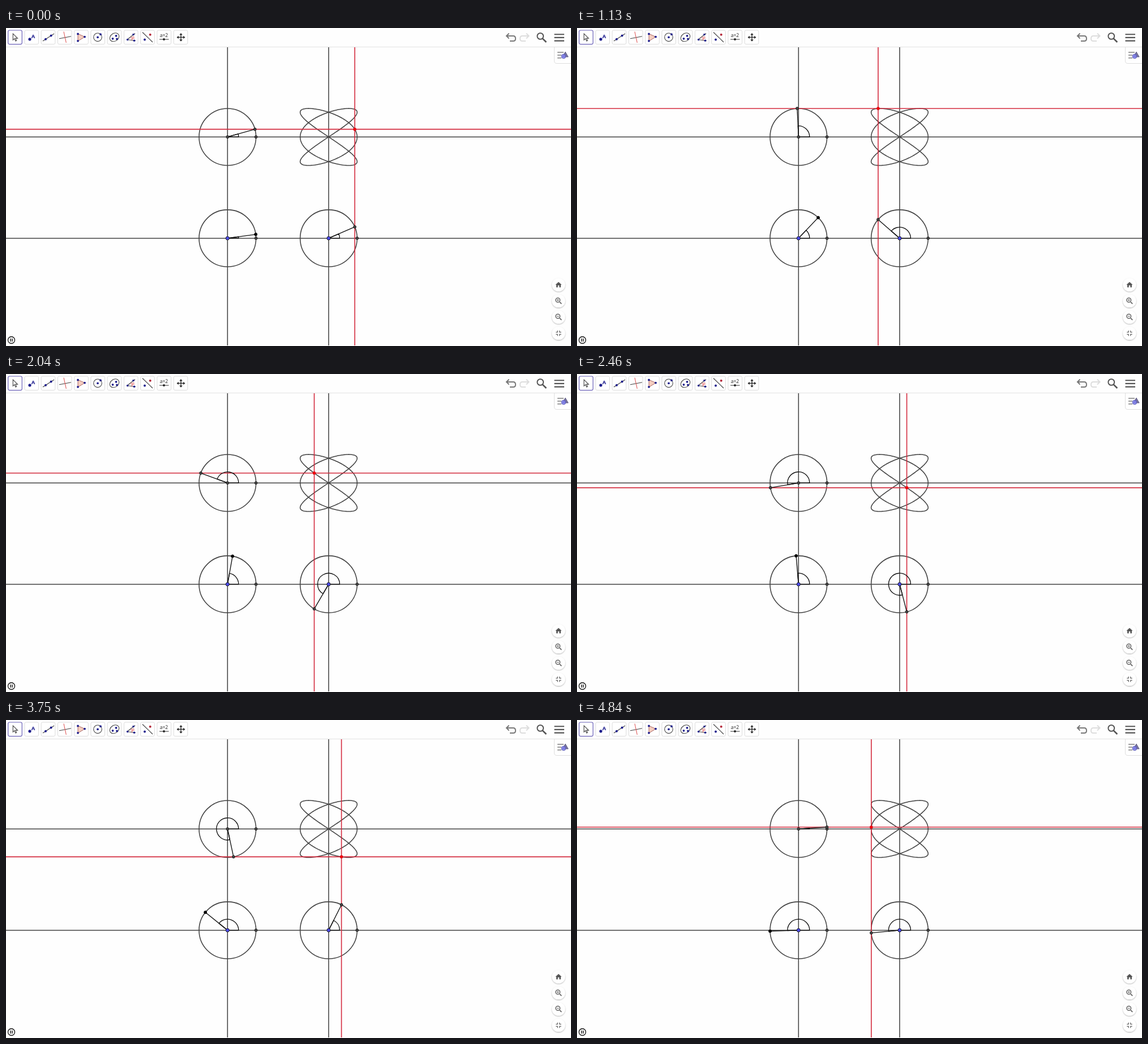
Animation of 998x561 px, one loop 4.88 s. Source, as an HTML page:

```html
<!DOCTYPE html>
<html lang="en">
<head>
<meta charset="utf-8">
<title>Lissajous construction</title>
<style>
html, body { margin: 0; width: 100%; height: 100%; overflow: hidden; background: #fefefe; }
svg { display: block; }
.thin { fill: none; stroke: #434343; stroke-width: 1.55; }
.arm { fill: none; stroke: #111; stroke-width: 1.35; stroke-linejoin: round; }
.red { stroke: #d32a3d; stroke-width: 1.6; }
.btn { fill: #fff; stroke: #dcdcdc; }
.btn.on { stroke: #6b62b8; stroke-width: 1.2; }
.ink { fill: none; stroke: #444; stroke-width: 1.1; }
.blue { fill: #1c1c8c; }
.zoom { fill: none; stroke: #666; stroke-width: 1.5; }
text { font-family: "Open Sans", Arial, sans-serif; }
</style>
</head>
<body>
<svg width="998" height="561" viewBox="0 0 998 561">
  <defs>
    <filter id="shadow" x="-30%" y="-30%" width="160%" height="160%">
      <feDropShadow dx="0" dy="1" stdDeviation="1.1" flood-opacity=".32"/>
    </filter>
  </defs>

  <g id="plot"></g>

  <g id="toolbar">
    <rect width="998" height="33.5" fill="#fefefe"/>
    <path d="M0 33.5H998" stroke="#e2e2e2"/>
    <g id="buttons"></g>
    <path class="ink" d="M12.3 10V21.2L15 18.7L16.9 23L18.7 22.2L16.9 18.1H20.5Z"/>
    <circle class="blue" cx="42" cy="19.8" r="2.6"/>
    <text x="44.8" y="17.5" font-size="9.5" font-weight="700" fill="#1c1c8c">A</text>
    <path class="ink" d="M65 23L85 10"/>
    <g class="blue"><circle cx="70" cy="19.7" r="2"/><circle cx="79.6" cy="13.5" r="2"/></g>
    <path class="ink" d="M94 18.8L115 14.8"/>
    <path d="M102 6.5L106.3 26" stroke="#d55" stroke-width="1.1"/>
    <path d="M127 10.2L139 15.6L127 23.2Z" fill="#f5cfc0" stroke="#a66" stroke-width="1"/>
    <g class="blue"><circle cx="127" cy="10.4" r="1.9"/><circle cx="139" cy="15.6" r="1.9"/><circle cx="127" cy="22.8" r="1.9"/></g>
    <circle class="ink" cx="162" cy="16.3" r="7.3"/>
    <g class="blue"><circle cx="162" cy="16.3" r="1.9"/><circle cx="167" cy="11.2" r="1.9"/></g>
    <ellipse class="ink" cx="191.5" cy="16.3" rx="8.8" ry="6.8" transform="rotate(-35 191.5 16.3)"/>
    <g class="blue"><circle cx="188.5" cy="18.8" r="1.9"/><circle cx="194.5" cy="13.8" r="1.9"/><circle cx="196" cy="19.3" r="1.9"/></g>
    <path class="ink" d="M228 9.5L214 20.5L229 22.5"/>
    <path d="M220.5 15.5Q223.8 17.8 222.5 21.5" fill="none" stroke="#d44"/>
    <text x="222.5" y="18.7" font-size="7" fill="#d33">α</text>
    <g class="blue"><circle cx="225" cy="11.5" r="1.8"/><circle cx="214.7" cy="20.5" r="1.8"/><circle cx="226.5" cy="22.2" r="1.8"/></g>
    <path class="ink" d="M241 7.5L259 25"/>
    <circle cx="254.7" cy="11.8" r="2" fill="#b52a3c"/><circle class="blue" cx="245" cy="20.5" r="2"/>
    <text x="279" y="15.7" font-size="8.5" text-anchor="middle" fill="#222">a=2</text>
    <path class="ink" d="M271 20H287.5"/><circle cx="279" cy="20" r="1.9" fill="#222"/>
    <path d="M309 11V22M303.5 16.4H314.5" stroke="#222" stroke-width="1.3"/>
    <path d="M309 9L311.7 12.2H306.3ZM309 23.8L311.7 20.6H306.3ZM301.6 16.4L304.8 13.7V19.1ZM316.4 16.4L313.2 13.7V19.1Z" fill="#222"/>
    <g id="undo" fill="none" stroke-width="2">
      <path d="M888.5 9.5L884 14L888.5 18.5M884.5 14H896Q900 14 900 18.8Q900 23 896 23H890" stroke="#777"/>
      <path d="M919 9.5L923.5 14L919 18.5M923 14H912Q908 14 908 18.8Q908 23 912 23H918" stroke="#ddd"/>
    </g>
    <circle cx="943.8" cy="14.4" r="5.4" fill="none" stroke="#555" stroke-width="2"/>
    <path d="M947.8 18.6L954.3 25" stroke="#555" stroke-width="2.7"/>
    <path d="M968.5 11.2H986M968.5 16.9H986M968.5 22.6H986" stroke="#555" stroke-width="2.1"/>
  </g>

  <path d="M999 33.5H968.5V58Q968.5 62.5 973 62.5H999Z" fill="#fff" stroke="#dedede"/>
  <path d="M974 42.8H985M974 47.8H981M974 52.8H981" stroke="#666" stroke-width="1.3"/>
  <path d="M988 42L993.2 51H982.8Z" fill="#77739c" stroke="#54517c" stroke-width=".8"/>
  <circle cx="985" cy="50" r="3.8" fill="#7f7fec" fill-opacity=".85" stroke="#5454b4" stroke-width=".9"/>

  <g id="zooms"></g>
  <path d="M970.5 453L976 448L981.500 453H980V457.500H977.300V454H974.700V457.500H972V453Z" fill="#555"/>
  <g class="zoom">
    <path d="M978 483.300L981.300 486.600M978 511.800L981.300 515.100" stroke-width="1.8"/>
    <circle cx="974.800" cy="480" r="3.800"/><circle cx="974.800" cy="508.500" r="3.800"/>
    <path d="M972.800 480H976.800M974.800 478V482M972.800 508.500H976.800" stroke-width="1"/>
    <path d="M971.300 536.700H974.200V533.800M980.700 536.700H977.800V533.800M971.300 540.300H974.200V543.200M980.700 540.300H977.800V543.200" stroke-width="1.300"/>
  </g>

  <circle cx="9.500" cy="550.500" r="6" fill="#fff" stroke="#111" stroke-width="1.300"/>
  <path d="M8 547.800V553.200M11 547.800V553.200" stroke="#111" stroke-width="1.400"/>
</svg>

<script>
const LOOP = 4880, R = 50.3, ARC = 19.5;
const X1 = 391.3, X2 = 569.9, Y1 = 192.2, Y2 = 370.9, TOP = 34, BOTTOM = 560;

// [step, base angle in degrees]
const KEYS = [[0, 7.8], [1, 7.8], [27, 46.35], [49, 79.87], [69, 109.82],
              [90, 141.08], [99, 154.22], [116, 181.8]];

const plot = document.getElementById('plot');
const rad = deg => deg * Math.PI / 180;

function set(el, attrs) {
  for (const name in attrs) el.setAttribute(name, attrs[name]);
  return el;
}
function add(tag, attrs, parent = plot) {
  return parent.appendChild(set(document.createElementNS('http://www.w3.org/2000/svg', tag), attrs));
}
const line = (d, cls = 'thin') => add('path', { d, class: cls });
const dot = (cx, cy, r = 2.4, fill = '#484848', stroke = '#111') =>
  add('circle', { cx, cy, r, fill, stroke, 'stroke-width': 0.9 });

// Interface buttons
for (let i = 0; i < 11; i++) {
  add('rect', { x: 3.7 + 29.25 * i, y: 4, width: 24.6, height: 24.6, rx: 2.5,
    class: i ? 'btn' : 'btn on' }, document.getElementById('buttons'));
}
for (let i = 0; i < 4; i++) {
  add('circle', { cx: 976, cy: 453 + 28.5 * i, r: 11.6, fill: '#fff',
    filter: 'url(#shadow)' }, document.getElementById('zooms'));
}

// Fixed construction
for (const y of [Y1, Y2]) line(`M0 ${y}H998`);
for (const x of [X1, X2]) line(`M${x} ${TOP}V${BOTTOM}`);
for (const [cx, cy] of [[X1, Y1], [X1, Y2], [X2, Y2]]) {
  add('circle', { cx, cy, r: R, class: 'thin' });
}
let curve = '';
for (let a = 0; a < 360; a++) {
  const x = X2 + R * Math.cos(rad(3 * a)), y = Y1 - R * Math.sin(rad(2 * a));
  curve += `${a ? 'L' : 'M'}${x.toFixed(2)} ${y.toFixed(2)}`;
}
line(curve + 'Z');

// Moving construction
const across = line('', 'red'), down = line('', 'red');
const dials = [
  { x: X1, y: Y1, n: 2 },
  { x: X1, y: Y2, n: 1 },
  { x: X2, y: Y2, n: 3 }
];
for (const d of dials) {
  d.sector = line('', 'arm');
  d.arm = line('', 'arm');
}
for (const d of dials) {
  dot(d.x + R, d.y);
  if (d.y === Y2) dot(d.x, d.y, 3.1, '#4d4df5');
  else dot(d.x, d.y);
  d.tip = d.n === 1 ? dot(0, 0, 2.5, '#000', '#000') : dot(0, 0);
}
const tracer = dot(0, 0, 2.5, '#f00', '#c81020');

function drawDial(d, base) {
  const deg = d.n * base % 360, c = Math.cos(rad(deg)), s = -Math.sin(rad(deg));
  const cx = d.x + R * c, cy = d.y + R * s;
  set(d.arm, { d: `M${d.x} ${d.y}L${cx} ${cy}` });
  set(d.sector, { d: `M${d.x} ${d.y}h${ARC}A${ARC} ${ARC} 0 ${+(deg > 180)} 0 ` +
    `${d.x + ARC * c} ${d.y + ARC * s}Z` });
  set(d.tip, { cx, cy });
  return { cx, cy };
}

// Steps are 41.7 ms long, rounded to 10 ms
function stepAt(t) {
  let k = Math.floor(t / 41.7) + 1;
  while (Math.round(k * 4.17) * 10 > t) k--;
  return k;
}
function angleAt(k) {
  const i = Math.max(1, KEYS.findIndex(key => key[0] >= k));
  const [k0, a0] = KEYS[i - 1], [k1, a1] = KEYS[i];
  return a0 + (a1 - a0) * (k - k0) / (k1 - k0);
}

function draw(t) {
  const base = angleAt(stepAt(t));
  const [upper, , right] = dials.map(d => drawDial(d, base));
  set(across, { d: `M0 ${upper.cy}H998` });
  set(down, { d: `M${right.cx} ${TOP}V${BOTTOM}` });
  set(tracer, { cx: right.cx, cy: upper.cy });
}

const start = performance.now();
function tick() {
  draw((performance.now() - start) % LOOP);
  requestAnimationFrame(tick);
}
tick();
</script>
</body>
</html>
```
